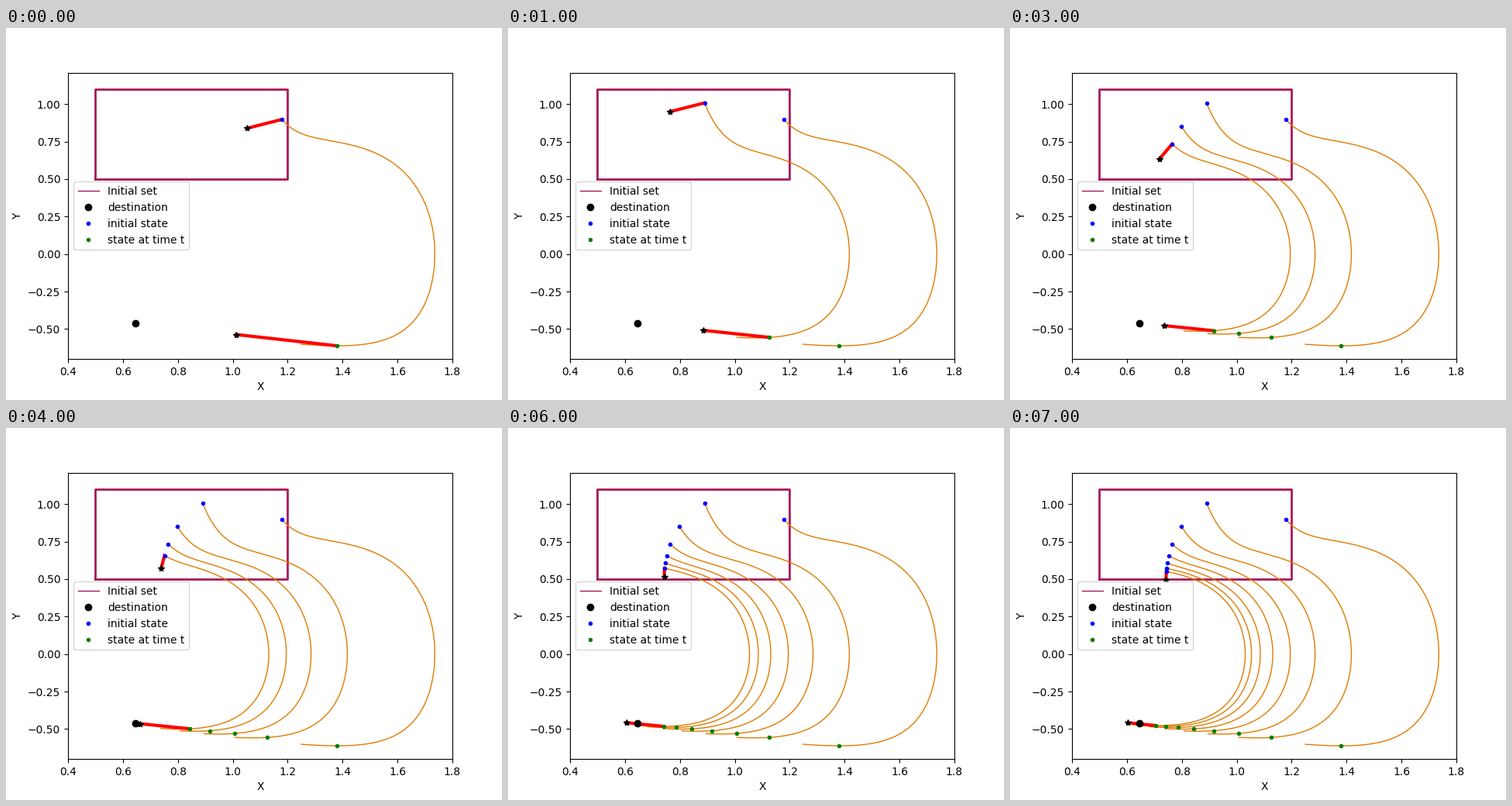
Recreate the animation shown at these times as a matplotlib script. Size 640x480 px, loop 8 s.

```python
import numpy as np
import matplotlib.pyplot as plt
from matplotlib.animation import FuncAnimation

ORANGE, PURPLE = "#e07b00", "#a8185a"
GOAL = np.array([0.6456, -0.461])
RUNS = 8
DECAY = 15.0     # how fast the start-up transient dies out
TAIL = 0.213     # time between the marked state and the end of a run


def settle(limit, amp, rate, kick):
    """One value per run, closing in on limit; kick mostly shifts the first."""
    i = np.arange(RUNS)
    return limit + amp * rate**i + kick * 0.04**i


def speed_sq(x, turn, u):
    """y**2 along x' = y, y' = u*y**2 - x, with y = 0 at the turning point."""
    tail = 1 / (2 * u * u)
    return x / u + tail - (turn / u + tail) * np.exp(2 * u * (x - turn))


def lower_y(x, turn):
    return -np.sqrt(np.maximum(speed_sq(x, turn, 2.3 + 0.8 * turn), 0))


def trajectory(start, turn, mark):
    x0, y0 = start
    u = 1.5 + 0.375 * turn
    s = np.linspace(1, 0, 200)
    xa = turn - (turn - x0) * s**2
    extra = y0**2 - speed_sq(x0, turn, u)
    e = speed_sq(xa, turn, u) + extra * np.exp(-DECAY * (xa - x0)) * s**2
    end = mark[0] + TAIL * mark[1]
    xb = turn - (turn - end) * s[::-1]**2
    x = np.concatenate([xa, xb])
    y = np.concatenate([np.sqrt(np.maximum(e, 0)), lower_y(xb, turn)])
    return x, y


def start_step(j):
    """Search step of the start: shrinks and swings round to straight down."""
    size, angle = 0.14 - 0.028 * j, np.radians(274 - 69 * 0.42**j)
    return size * np.array([np.cos(angle), np.sin(angle)])


turns = settle(0.975, 0.615, 0.71, 0.146)
starts = np.column_stack([settle(0.743, 0.37, 0.39, 0.066),
                          settle(0.505, 0.78, 0.665, -0.387)])
mark_x = settle(0.56, 0.705, 0.797, 0.115)
marks = np.column_stack([mark_x, lower_y(mark_x, turns)])

fig, ax = plt.subplots(figsize=(6.4, 4.8), dpi=100)
ax.set(xlim=(0.4, 1.8), ylim=(-0.7, 1.21), xlabel="X", ylabel="Y")

ax.plot([0.5, 1.2, 1.2, 0.5, 0.5], [0.5, 0.5, 1.1, 1.1, 0.5], color=PURPLE, lw=2)
key_set, = ax.plot([], [], color=PURPLE, lw=1, label="Initial set")
goal, = ax.plot(*GOAL, "o", color="black", zorder=6, label="destination")

curves = [ax.plot(*trajectory(*run), color=ORANGE, lw=1)[0]
          for run in zip(starts, turns, marks)]
arrows = [ax.plot([], [], color="red", lw=3, zorder=3)[0] for _ in range(2)]
stars, = ax.plot([], [], "*", color="black", zorder=5)
blue, = ax.plot([], [], ".", color="blue", zorder=4, label="initial state")
green, = ax.plot([], [], ".", color="green", zorder=4, label="state at time t")
ax.legend(handles=[key_set, goal, blue, green], loc="center left")


def draw(i):
    for k, curve in enumerate(curves):
        curve.set_visible(k <= i)
    blue.set_data(*starts[:i + 1].T)
    green.set_data(*marks[:i + 1].T)
    # Both steps are renewed on every second run, in turn.
    goal_step = (GOAL - marks[(i + 1) // 2]) / 2
    tips = [starts[i] + start_step(i // 2), marks[i] + goal_step]
    for arrow, base, tip in zip(arrows, (starts[i], marks[i]), tips):
        arrow.set_data([base[0], tip[0]], [base[1], tip[1]])
    stars.set_data(*np.array(tips).T)
    return [*curves, *arrows, stars, blue, green]


anim = FuncAnimation(fig, draw, frames=RUNS, interval=1000, repeat=True)
plt.show()
```
